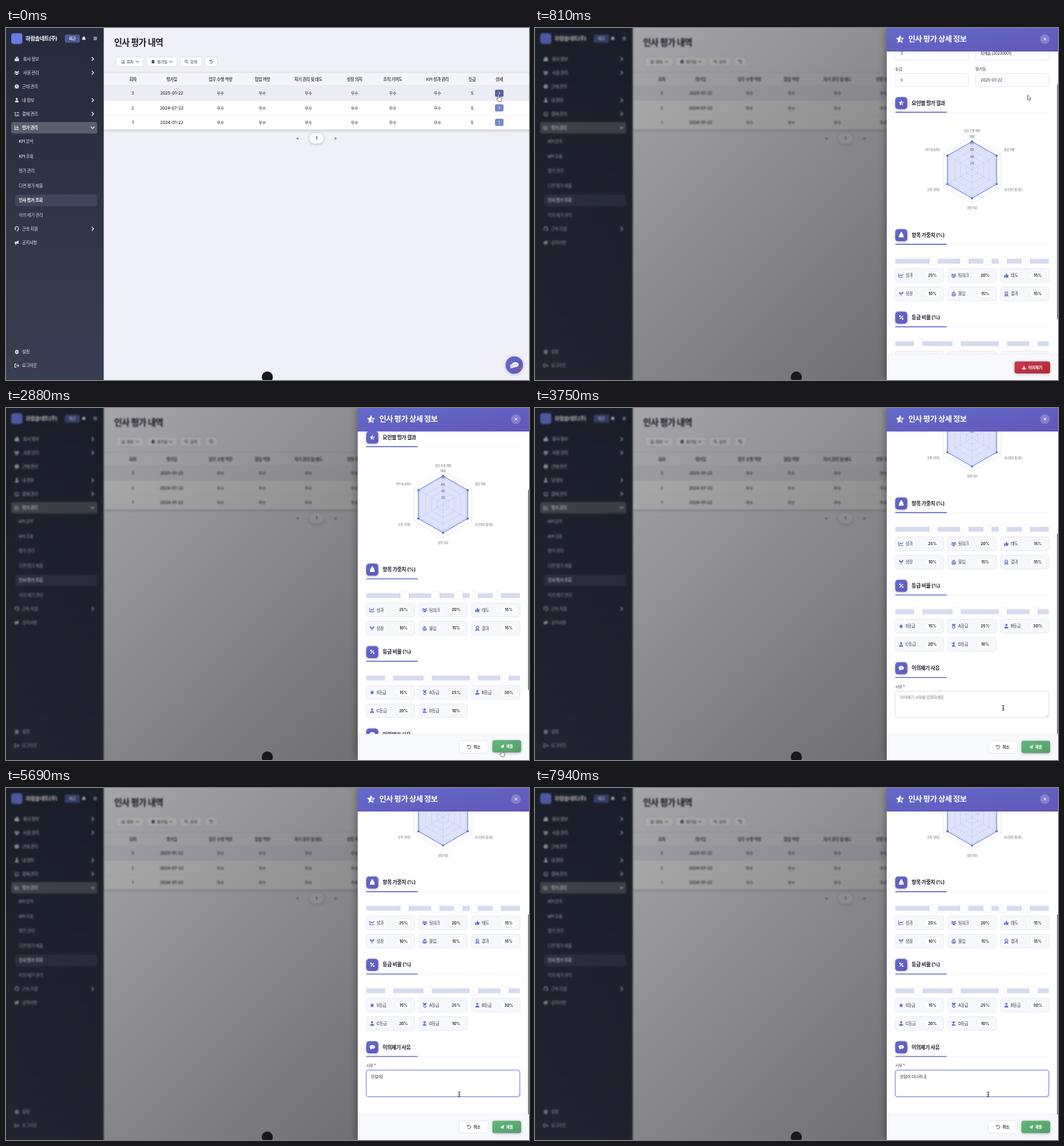
Animation of 800 by 539 pixels, one loop 8000 ms. Source, as an HTML page:

```html
<!DOCTYPE html>
<html>
<head>
<meta charset="utf-8">
<style>
html, body { margin: 0; width: 100%; height: 100%; overflow: hidden; background: #f0f0f8; }
svg { display: block; width: 100vw; height: 100vh; }
text { font-family: Inter, "Noto Sans CJK KR", "Noto Sans CJK", sans-serif; white-space: pre; }
.ko { letter-spacing: -.047em; }
.soft { filter: drop-shadow(0 .5px 1px #1a1a4022); }
.lift { filter: drop-shadow(0 1.5px 2px #1a1a4044); }
</style>
</head>
<body>
<svg id="stage" viewBox="0 0 800 539" preserveAspectRatio="none"></svg>
<script>
// Icons fit a box of about 10 units around 0,0; a leading ~ means outline only.
const ICONS = {
  building: 'M-5 -1H-2V-5H3V-1H5V5H-5ZM-1 -3V-2H0V-3ZM1 -3V-2H2V-3ZM-1 0V1H0V0ZM1 0V1H2V0Z',
  users: 'M-3.4 -1a1.6 1.6 0 1 1 .1 0ZM3.4 -1a1.6 1.6 0 1 1 .1 0ZM0 1a2 2 0 1 1 .1 0ZM-6 2q0-2.5 3-2.5q0 2 3 2t3-2q3 0 3 2.5ZM-3 5q0-3 3-3t3 3Z',
  clock: 'M0 -5a5 5 0 1 0 .1 0ZM-.6 -3H.6V0L2.5 1.5L1.8 2.4L-.6 .6Z',
  user: 'M0 -.4a2.4 2.4 0 1 1 .1 0ZM-4.4 5q0-4.6 4.4-4.6t4.4 4.6Z',
  list: '~M-5 -3L-4 -2L-2.5 -4M-5 1L-4 2L-2.5 0M0 -3H5M0 1H5M-4 4.5H5',
  chart: '~M-4.5 -5V4.5H5M-2 2V0M.5 2V-4M3 2V-2',
  headset: '~M-4 2V-1a4 4 0 0 1 8 0V2M-3 0V3M3 0V3Q3 5 0 5',
  horn: 'M-5 -2H-1L4 -5V4L-1 1.5V5H-3.5L-4 1.5H-5Z',
  gear: 'M-1 -5H1L1.5 -3.5L3.5 -4L4.5 -2L3.5 0L4.5 2L3.5 4L1.5 3.5L1 5H-1L-1.5 3.5L-3.5 4L-4.5 2L-3.5 0L-4.5 -2L-3.5 -4L-1.5 -3.5ZM0 -1.7a1.7 1.7 0 1 0 .1 0Z',
  exit: '~M-1 -4H-4.5V4H-1M-1.5 0H4.5M2 -2.7L4.7 0L2 2.7',
  bell: 'M0 -5Q3.5 -4 3.5 0L5 3H-5L-3.5 0Q-3.5 -4 0 -5ZM-1.5 4H1.5Q0 6 -1.5 4Z',
  menu: '~M-5 -3.5H5M-5 0H5M-5 3.5H5',
  right: '~M-1.8 -3.8L2 0L-1.8 3.8',
  down: '~M-3.8 -1.8L0 2L3.8 -1.8',
  search: '~M-1 -4.5a3.4 3.4 0 1 0 .1 0M1.5 1.5L5 5',
  undo: '~M-4.5 -4.5V-1.5H-1.5M-4.3 -1.7A4.3 4.3 0 1 1 -3 3.5',
  star: 'M0 -5L1.5 -1.7L5 -1.3L2.4 1.1L3.1 4.7L0 2.9L-3.1 4.7L-2.4 1.1L-5 -1.3L-1.5 -1.7Z',
  halfStar: 'M0 -5L1.5 -1.7L5 -1.3L2.4 1.1L3.1 4.7L0 2.9L-3.1 4.7L-2.4 1.1L-5 -1.3L-1.5 -1.7ZM.5 -2.5V2.2L2 3L1.4 .7L3 -.6L1 -.9Z',
  clipboard: 'M-4 -4H-1.5V-5H1.5V-4H4V5H-4ZM-2.2 .8L-.6 2.4L2.4 -.8L1.6 -1.6L-.6 .7L-1.4 0Z',
  weight: 'M-1.5 -2.5a2 2 0 1 1 3 0H3L5 4.5H-5L-3 -2.5Z',
  percent: '~M3 -3L-3 3M-2.5 -3.5a1 1 0 1 0 .1 0M2.5 1.5a1 1 0 1 0 .1 0',
  comment: 'M0 -4.2C7 -4.2 7 3.2 0 3.2L-4.5 4.6L-3.4 2C-7 -1 -4 -4.2 0 -4.2ZM-2.6 -1V0H-1.6V-1ZM-.5 -1V0H.5V-1ZM1.6 -1V0H2.6V-1Z',
  line: '~M-5 -4.5V4H5M-3 1L-1 -1.5L1 .5L4.5 -3',
  thumb: 'M-5 -1H-2.8V5H-5ZM-2 -1L0 -5Q2 -5 1.2 -1.4H4.8L4 4.5H-2Z',
  sprout: 'M-5 -4Q0 -4 0 1Q0 -4 5 -4.5Q5 .5 .8 1V5H-.8V1Q-5 1 -5 -4Z',
  fire: '~M0 -4.5Q4 -1 4 1.5A4 3.5 0 0 1 -4 1.5Q-4 -1 -2 -2.5L-1 -1ZM0 1L1.5 2.5H-1.5Z',
  award: '~M0 -4.5a3 3 0 1 0 .1 0M-2 1.5L-3.5 5L0 3.8L3.5 5L2 1.5M0 -2V-1',
  medal: '~M-4 -5L-1 -.5M4 -5L1 -.5M0 -.5a2.6 2.6 0 1 0 .1 0M-2 -5L0 -2L2 -5',
  userSlash: 'M0 -.4a2.4 2.4 0 1 1 .1 0ZM-4.4 5q0-4.6 4.4-4.6t4.4 4.6ZM-5.5 -4.5L5.5 4.2L4.9 5L-6 -3.7Z',
  warn: 'M0 -4.5L5.2 4.5H-5.2ZM-.6 -1.5L-.4 1.5H.4L.6 -1.5ZM-.5 2.4V3.4H.5V2.4Z',
  plane: 'M5 -5L3 4.5L0 3L-1.8 5V1.8L3 -3L-2.8 1.4L-5 .4Z',
  cross: '~M-3.5 -3.5L3.5 3.5M3.5 -3.5L-3.5 3.5'
};

const icon = (name, x, y, s = .65, color = '#e4e5ec') => {
  const d = ICONS[name], open = d[0] === '~';
  const paint = open ? `fill="none" stroke="${color}" stroke-width="1.6"` : `fill="${color}" fill-rule="evenodd"`;
  return `<path transform="translate(${x} ${y}) scale(${s})" ${paint} d="${open ? d.slice(1) : d}"/>`;
};
const text = (x, y, str, size = 6.4, color = '#333644', weight = 500, anchor = 'start', extra = '') =>
  `<text x="${x}" y="${y + size * .36}" font-size="${size}" fill="${color}" font-weight="${weight}" text-anchor="${anchor}" class="${/[가-힣]/.test(str) ? 'ko' : ''}" ${extra}>${str}</text>`;
const mid = (x, y, str, size, color, weight) => text(x, y, str, size, color, weight, 'middle');
const box = (x, y, w, h, fill, r = 0, extra = '') =>
  `<rect x="${x}" y="${y}" width="${w}" height="${h}" rx="${r}" fill="${fill}" ${extra}/>`;
const gradient = (id, a, b, dir = 'x2="1" y2="1"') =>
  `<linearGradient id="${id}" ${dir}><stop stop-color="${a}"/><stop offset="1" stop-color="${b}"/></linearGradient>`;

const defs = `<defs>
  ${gradient('side', '#242a3a', '#3a3f53', 'x2="0" y2="1"')}
  ${gradient('violet', '#626bcb', '#6257b9')}
  ${gradient('logo', '#667eea', '#6f78d8')}
  ${gradient('red', '#c83b48', '#ad2b37')}
  ${gradient('green', '#62b87c', '#569c6a')}
  <linearGradient id="shade" gradientUnits="userSpaceOnUse" x2="669.5" y2="669.5">
    <stop stop-opacity=".28"/><stop offset="1" stop-opacity=".6"/></linearGradient>
  <clipPath id="view"><rect x="538" y="36" width="262" height="463.5"/></clipPath>
</defs>`;

function sidebar() {
  let s = box(-20, -20, 169.5, 580, 'url(#side)')
    + box(8, 8, 17, 16.5, 'url(#logo)', 4)
    + text(30, 16, '하람솔네트(주)', 8.2, '#fff', 700)
    + box(90, 10, 23, 12.5, '#4a5a94', 2.5) + mid(101.5, 16, '퇴근', 5.8, '#e8ebf8', 600)
    + icon('bell', 119, 16, .6, '#fff') + icon('menu', 136.5, 16, .52, '#fff')
    + box(8, 144, 131.5, 17.5, '#5b5f6c', 3)
    + box(14, 255, 125.5, 18, '#41465a', 3);
  const items = [
    ['building', '회사 정보', 47.5, 'right'], ['users', '사원 관리', 68.5, 'right'], ['clock', '근태 관리', 89.5],
    ['user', '내 정보', 110.5, 'right'], ['list', '결재 관리', 131.5, 'right'], ['chart', '평가 관리', 152.5, 'down'],
    ['headset', '근속 지원', 307.5, 'right'], ['horn', '공지사항', 328.5], ['gear', '설정', 496], ['exit', '로그아웃', 517]
  ];
  items.forEach(([ic, label, y, arrow], i) => {
    s += icon(ic, 16.5, y, .65) + text(i < 2 ? 26 : 24.5, y, label, 6.5, '#eceef4', i === 5 ? 600 : 500);
    if (arrow) s += icon(arrow, 132.5, y, .75, '#f2f3f7');
  });
  ['KPI 분석', 'KPI 조회', '평가 관리', '다면 평가 제출', '인사 평가 조회', '이의 제기 관리'].forEach((label, i) =>
    s += text(19.5, 173.7 + i * 22.55, label, 6.5, i === 4 ? '#fff' : '#dcdee8', i === 4 ? 700 : 500));
  return s;
}

function listPage() {
  const ink = '#343748';
  let s = box(149, -20, 680, 590, '#f0f0f8') + text(165.5, 22, '인사 평가 내역', 13.3, '#1d1f2b', 700);
  const pill = (x, w) => box(x, 45, w, 13.3, '#fff', 3, 'class="soft"');
  s += pill(169, 41) + icon('list', 179, 51.5, .52, ink) + text(184.5, 51.5, '회차', 6, ink) + icon('down', 201, 51.5, .6, ink)
    + pill(216, 45) + icon('clipboard', 225, 51.5, .52, ink) + text(231, 51.5, '평가일', 6, ink) + icon('down', 252, 51.5, .6, ink)
    + pill(267, 32) + icon('search', 276, 51.5, .52, ink) + text(281.5, 51.5, '검색', 6, ink)
    + pill(305, 18) + icon('undo', 314, 51.5, .52, ink);
  s += `<g class="lift">${box(149.5, 69, 670, 86.5, '#fff')}</g>`
    + box(149.5, 69, 670, 19, '#f4f4fa') + box(149.5, 88, 670, 23, '#ececf5')
    + box(149.5, 87.7, 670, .5, '#e0e1ec') + box(149.5, 111, 670, .5, '#e8e9f1') + box(149.5, 133, 670, .5, '#ededf4');
  const cols = [194, 253.5, 328, 392, 462.5, 533, 591.5, 660, 713, 754.5];
  const heads = ['회차', '평가일', '업무 수행 역량', '협업 역량', '자기 관리 및 태도', '성장 의지', '조직 기여도', 'KPI 성과 관리', '등급', '상세'];
  heads.forEach((h, i) => s += mid(cols[i], 78.5, h, 6.4, '#4a4d5c', 600));
  ['2025-01-22', '2024-07-22', '2024-01-22'].forEach((date, r) => {
    const y = 100 + r * 22.3;
    [3 - r, date, ...Array(6).fill('우수'), 'S'].forEach((v, i) => s += mid(cols[i], y, String(v), 6.2, '#22242e', 500));
    s += box(748, y - 5.5, 13, 11, r ? '#7488c9' : '#51609f', 2) + icon('right', 754.5, y, .55, '#fff');
  });
  s += `<g class="lift">${box(464, 161, 22, 16, '#f8f8fd', 8)}</g>` + mid(446, 169, '&lt;', 6.4, ink, 600)
    + mid(475, 169, '1', 6.4, ink, 600) + mid(504, 169, '&gt;', 6.4, ink, 600);
  return s + `<circle cx="777.5" cy="516" r="13.3" fill="url(#violet)" class="lift"/>`
    + '<circle cx="787" cy="521" r="2" fill="#e0455a"/>' + icon('comment', 779, 516, 1, '#fff') + icon('comment', 774.5, 518, .75, '#dfe2fa');
}

function section(y, ic, title) {
  return box(551, y - 9, 18.5, 18.5, 'url(#violet)', 4.5, 'class="lift"') + icon(ic, 560.3, y, .8, '#fff')
    + text(576, y, title, 7.9, '#20222d', 700)
    + box(551, y + 14, 235, .6, '#eceef5') + box(551, y + 13.6, 79, 1.4, '#5c63c6', .6);
}

function field(x, y, label, value) {
  return text(x, y, label, 6, '#3d4050')
    + box(x, y + 7, 112.5, 20, '#fdfdff', 3, 'stroke="#dfe1ea" stroke-width=".7"')
    + text(x + 8, y + 17, value, 6, '#2a2c38', 400);
}

function radar(cx, cy) {
  const at = (k, r) => [cx + r * Math.sin(k * Math.PI / 3), cy - r * Math.cos(k * Math.PI / 3)];
  const hex = (r, style) => `<polygon points="${[0, 1, 2, 3, 4, 5].map(k => at(k, r)).join(' ')}" ${style}/>`;
  const grid = 'stroke="#d4d6de" stroke-width=".5"';
  let s = '';
  for (let k = 0; k < 6; k++) {
    const [x, y] = at(k, 51);
    s += `<path d="M${cx} ${cy}L${x} ${y}" ${grid}/>`;
  }
  for (let v = 1; v <= 5; v++) s += hex(v * 10.2, `fill="none" ${grid}`);
  s += hex(43.5, 'fill="#667eea" fill-opacity=".22" stroke="#5b70d8" stroke-width="1"');
  for (let k = 0; k < 6; k++) {
    const [x, y] = at(k, 43.5);
    s += `<circle cx="${x}" cy="${y}" r="1.7" fill="#5b70d8"/>`;
  }
  for (let v = 1; v <= 5; v++) s += mid(cx, cy - v * 10.2, String(v * 20), 4.9, '#555', 400);
  const small = (x, y, str, anchor) => text(x, y, str, 4.3, '#666', 400, anchor);
  return s + small(cx, 223, '업무 수행 역량', 'middle') + small(717.5, 251.5, '협업 역량') + small(717.5, 313, '자기관리 및 태도')
    + small(cx, 341, '성장 의지', 'middle') + small(619.5, 313, '조직 기여도', 'end') + small(619.5, 251.5, 'KPI 성과관리', 'end');
}

// A split bar with handles at the running totals, and one chip per share.
function shares(y, list) {
  let s = box(551, y, 235, 7.5, '#d6dbf1', 1), sum = 0;
  list.forEach(([ic, label, pct], i) => {
    sum += pct;
    if (sum < 100) {
      const x = 551 + 2.35 * sum;
      s += box(x - 6.5, y - 2.2, 13, 11.8, '#fff', 2.5, 'class="soft"') + box(x - .4, y + 2, .8, 3.5, '#eceef4');
    }
    const cx = 551.2 + (i % 3) * 80.5, cy = y + 25.8 + (i > 2) * 28;
    s += box(cx, cy - 10.5, 74, 21, '#f7f8fc', 3.5, 'stroke="#dfe2ee" stroke-width=".7"')
      + icon(ic, cx + 8.8, cy, .7, '#6873c4') + text(cx + 15.5, cy, label, 6.4, '#3f4252')
      + box(cx + 44.5, cy - 6, 24.5, 12, '#fff', 6, 'stroke="#e2e4ee" stroke-width=".6"')
      + mid(cx + 56.8, cy, pct + '%', 5.9, '#2b2d3a', 700);
  });
  return s;
}

function drawer() {
  const body = section(59.5, 'clipboard', '인사 평가 정보')
    + field(551, 87.3, '회차', '3') + field(673.5, 87.3, '사원명', '탁해솜 (20230001)')
    + field(551, 127.8, '등급', 'S') + field(673.5, 127.8, '평가일', '2025-01-22')
    + section(180, 'halfStar', '요인별 평가 결과') + radar(668.5, 282.5)
    + section(382.3, 'weight', '항목 가중치 (%)')
    + shares(418.5, [['line', '성과', 25], ['users', '팀워크', 20], ['thumb', '태도', 15], ['sprout', '성장', 10], ['fire', '몰입', 15], ['award', '결과', 15]])
    + section(508.5, 'percent', '등급 비율 (%)')
    + shares(544.7, [['star', 'S등급', 15], ['medal', 'A등급', 25], ['user', 'B등급', 30], ['user', 'C등급', 20], ['userSlash', 'D등급', 10]])
    + `<g id="appeal">${section(634.7, 'comment', '이의제기 사유')}${text(551, 663, '사유 *', 6, '#3d4050')}
      ${box(551.2, 670, 234.6, 40.5, '#fff', 3, 'id="area" stroke-width=".8"')}
      <path d="M782 709.5L785 706.5M784 709.5L785 708.5" stroke="#777" stroke-width=".5"/>
      ${text(558.5, 679.7, '이의제기 사유를 입력하세요.', 6.1, '#777a85', 400, 'start', 'id="hint"')}
      ${text(558.5, 679.7, '만', 6.1, '#2a2c38', 400, 'start', 'id="typed"')}${box(0, 676.3, .6, 7, '#333', 0, 'id="caret"')}</g>`;
  return box(538, 0, 290, 539, '#fff', 0, 'style="filter:drop-shadow(-3px 0 5px #0004)"')
    + `<g clip-path="url(#view)"><g id="body">${body}</g></g>`
    + box(538, 0, 262, 36, 'url(#violet)') + icon('halfStar', 558.3, 17, 1.25, '#fff')
    + text(571, 17, '인사 평가 상세 정보', 11.8, '#fff', 700)
    + '<circle cx="780" cy="17" r="7.5" fill="#fff" fill-opacity=".22"/>' + icon('cross', 780, 17, .58, '#fff')
    + box(538, 499.5, 262, 40, '#f8f9fc') + box(538, 499.3, 262, .6, '#e4e6ee')
    + `<g id="ask">${box(733.5, 510.5, 54.5, 18.5, 'url(#red)', 3.5, 'class="lift"')}${icon('warn', 748, 520, .6, '#fff')}${text(754.5, 520, '이의제기', 6.1, '#fff', 700)}</g>`
    + `<g id="reply">${box(693.5, 509.5, 44, 19, '#fff', 3.5, 'stroke="#dcdfe8" stroke-width=".7"')}${icon('undo', 708.5, 519, .6, '#444')}${text(715, 519, '취소', 6.1, '#3d4050', 600)}
      <g id="send">${box(744, 509.5, 44, 19, 'url(#green)', 3.5, 'class="lift"')}${icon('plane', 759, 519, .6, '#fff')}${text(765, 519, '제출', 6.1, '#fff', 700)}</g></g>`
    + box(798.6, 36, 1.4, 359, '#6b6c73', .7, 'id="thumb"');
}

const pointers = `<g id="pointer" stroke="#222" stroke-width=".6" stroke-linejoin="round" fill="#fff">
  <path id="hand" d="M-.9 .6Q0 -.8 .9 .6V4Q1.8 3.2 2.5 4.3Q3.4 3.6 4 4.8Q5 4.4 5 5.8Q5 8.5 3.8 10H-.6Q-1.4 8.4 -3.3 6.4Q-3 4.6 -.9 6Z"/>
  <path id="arrow" d="M0 0V7.6L1.7 6L2.9 8.7L4.2 8.1L3 5.5H5.4Z"/>
  <path id="beam" fill="none" stroke-width=".9" d="M-1.8 -3.7Q0 -3.7 0 -2.6Q0 -3.7 1.8 -3.7M0 -2.6V2.8M-1.3 .6H1.3M-1.8 3.8Q0 3.8 0 2.8Q0 3.8 1.8 3.8"/></g>`;

const stage = document.getElementById('stage');
stage.innerHTML = defs + `<g id="page">${listPage()}${sidebar()}</g>`
  + box(0, 0, 800, 539, 'url(#shade)', 0, 'id="dim"') + `<g id="panel">${drawer()}</g>`
  + '<circle cx="399.7" cy="534.5" r="8.5" fill="#17181c"/>' + pointers;

const el = {};
stage.querySelectorAll('[id]').forEach(e => el[e.id] = e);
const show = (e, on) => e.setAttribute('display', on ? 'inline' : 'none');
const shift = (e, x, y) => e.setAttribute('transform', `translate(${x} ${y})`);
const ease = (t, a, b) => {
  const p = Math.min(1, Math.max(0, (t - a) / (b - a)));
  return p * p * (3 - 2 * p);
};

// Syllables build up key by key.
const strokes = ['', 'ㅁ', '마', '만', '맍', '만저', '만점', '만점ㅇ', '만점이',
  ...['', 'ㅇ', '아', '안', '아니', '아닐', '아니라', '아니란', '아니라니'].map(s => '만점이 ' + s)];
const typedCount = t => t < 4810 ? 0
  : t < 5900 ? Math.min(8, 1 + Math.floor((t - 4810) / 115))
  : Math.min(17, 9 + Math.floor((t - 5900) / 210));

function render(t) {
  const open = ease(t, 60, 245);
  el.page.style.filter = open ? `blur(${1.3 * open}px)` : 'none';
  el.dim.setAttribute('opacity', open);
  show(el.panel, open > 0);
  shift(el.panel, 262 * (1 - open), 0);

  const appeal = t >= 2100, focus = t >= 4520;
  const scroll = 135 * ease(t, 630, 1000) + 101.4 * ease(t, 2940, 3690) + 1.5 * ease(t, 3760, 3900);
  const total = appeal ? 702 : 599;
  shift(el.body, 0, -scroll);
  el.thumb.setAttribute('y', 36 + scroll * 464 / total);
  el.thumb.setAttribute('height', 464 * 464 / total);
  show(el.appeal, appeal);
  show(el.ask, !appeal);
  show(el.reply, appeal);
  shift(el.send, 0, -ease(t, 2150, 2300) * (1 - ease(t, 3000, 3150)));

  const typed = strokes[typedCount(t)];
  el.area.setAttribute('stroke', focus ? '#6a74d0' : '#d5d8e4');
  el.area.style.filter = focus ? 'drop-shadow(0 0 1px #667eea88)' : 'none';
  show(el.hint, !typed);
  el.typed.textContent = typed;
  el.caret.setAttribute('x', 559 + (typed ? el.typed.getComputedTextLength() : 0));
  show(el.caret, focus);

  const down = ease(t, 1310, 1720), up = ease(t, 2950, 3690), rest = ease(t, 3780, 4450);
  shift(el.pointer, 753.5 + 3.5 * down + 1.2 * ease(t, 2200, 2700) - 42 * up - 23 * rest,
    102.5 + 421.5 * down - 65 * up + 10 * rest);
  const hand = t < 60 || (t > 1640 && t < 3080), beam = t > 3450;
  show(el.hand, hand);
  show(el.beam, beam);
  show(el.arrow, !hand && !beam);
}

const start = performance.now();
function tick() {
  render((performance.now() - start) % 8000);
  requestAnimationFrame(tick);
}
render(0);
requestAnimationFrame(tick);
</script>
</body>
</html>
```
